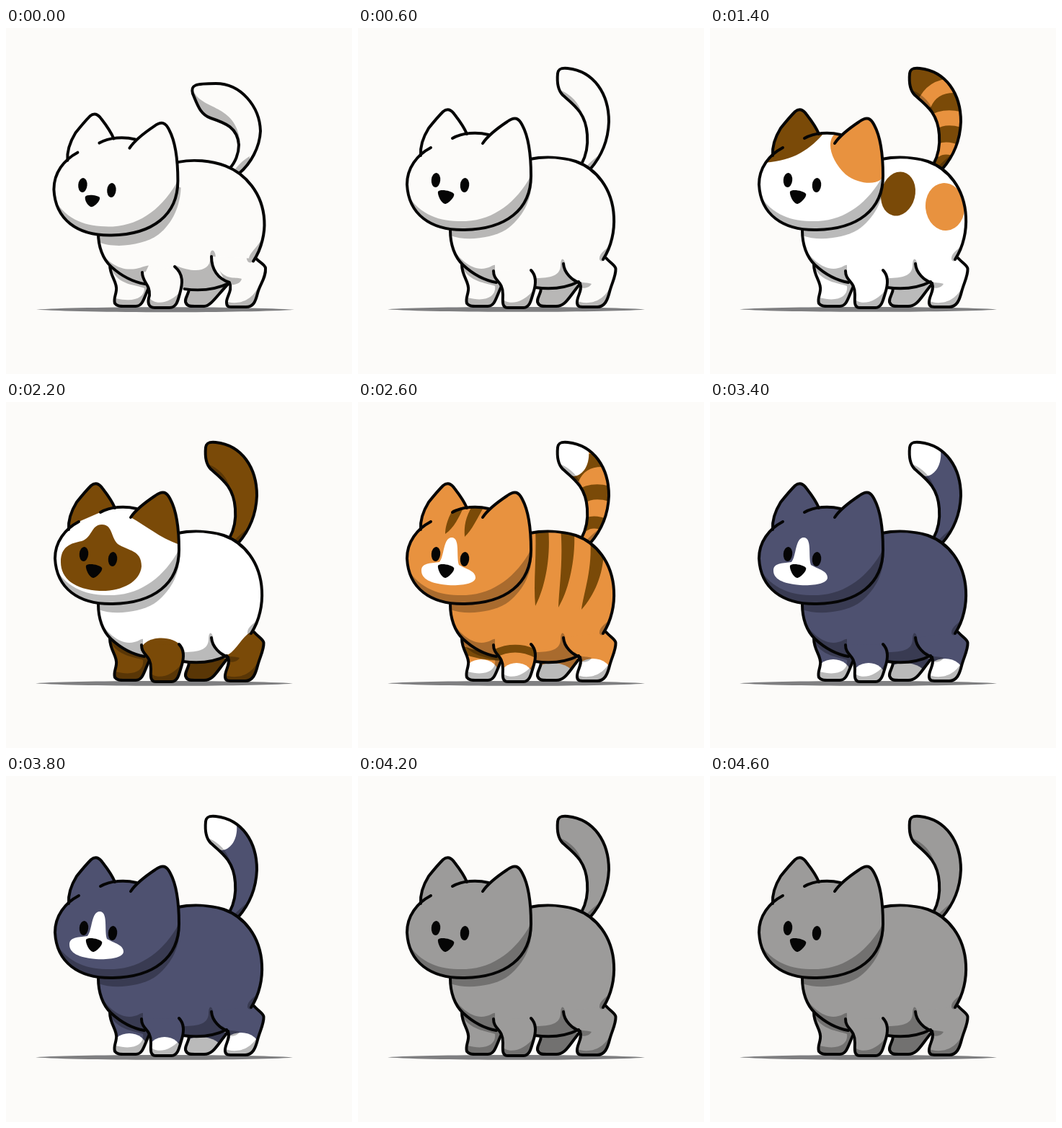
Recreate the animation shown at these times as an HTML page. Size 480 by 480 pixels, loop 4800 ms.

```html
<!DOCTYPE html>
<html lang="en">
<head>
<meta charset="utf-8">
<title>Walking coats</title>
<style>
html, body { margin: 0; width: 100%; height: 100%; overflow: hidden; background: #fcfbf9; }
svg { display: block; width: 100vw; height: 100vh; }
</style>
</head>
<body>
<svg id="stage" viewBox="0 0 480 480"></svg>
<script>
const STEP = 200;
const LIFTS = [0, 1, 1.13, 1];
const PAPER = '#fcfbf9', WHITE = '#fff', ORANGE = '#e8923f', BROWN = '#7a4a08', NAVY = '#4e5170', GREY = '#9c9b9a';

// Paths written "raised|lowered" are blended by the lift of the pose.
const extend = (path, end) => path.split('|').map(d => d + end).join('|');

const TAIL = 'M310 189C317 176 319 160 318 148C316 118 300 107 284 93C277 86 276 74 277 63C278 56 283 55 291 56C328 60 348 92 348 130C347 158 336 180 322 196'
  + '|M310 195C318 187 323 174 323 162C321 138 305 132 284 125C269 120 265 105 259 91C256 79 262 77 291 77C326 77 352 109 353 143C352 165 340 188 323 202';
const TAIL_SHADE = 'M277 85C295 91 308 104 312 124L285 110Z|M260 87C272 115 318 104 325 158L270 140Z';
const TAIL_ROOT = 'M313 198C319 188 325 184 332 178L332 202Z|M313 202C321 191 328 184 338 178L338 206Z';
const TAIL_TIP = 'M265 45L318 60C324 75 318 100 300 103L265 95Z|M240 60L298 70C304 90 298 112 280 120L245 115Z';
const BANDS = [
  ['M297 106Q308 80 338 80|M294 122Q296 98 316 84', 20],
  ['M308 132Q325 120 352 128|M308 146Q328 126 356 126', 21],
  ['M312 172Q326 162 346 172|M316 168Q334 160 356 174', 17]
];

const FAR_FRONT = 'M144 328C144 345 155 352 153 364C152 372 149 376 151 382C154 386 158 386 165 386L180 386C190 386 191 375 199 358';
const FAR_FRONT_SHADE = 'M143 326L146 335C158 354 182 354 190 358C192 372 178 381 152 374L148 392L202 392L202 326Z'
  + '|M143 326L146 334C156 358 182 356 192 361C192 374 178 381 152 375L148 392L202 392L202 326Z';
const FAR_HIND = 'M254 360C254 370 248 373 249 380C251 386 255 386 262 386L275 386C288 386 292 374 308 355'
  + '|M254 361C254 370 248 373 249 380C251 386 255 386 262 386L275 386C284 386 292 372 310 353';
const FRONT = 'M188 337C188 352 201 350 201 370C201 378 199 388 208 388L230 388C238 388 240 378 243 368C247 356 248 344 240 336'
  + '|M189 339C189 353 200 355 199 371C196 380 197 388 206 388L227 388C236 388 238 380 241 369C245 355 247 342 234 331';
const HIND = 'M285 327C286 340 297 350 308 354C312 365 303 372 304 382C305 387 308 387 314 387L332 387C342 387 346 378 349 366C352 354 358 344 357.5 334C357 329 350 326 344 319'
  + '|M285 317C285 335 294 348 310 353C315 364 305 374 306 381C306 387 309 387 315 387L333 387C343 387 346 380 349 368C352 356 361 346 360 333C359 328 353 326 347 320';
const HIND_SHADE = 'M300 346C308 356 318 352 324 355C320 362 312 361 305 360Z|M296 336C306 350 320 345 327 348C325 356 315 357 306 356Z';

const CHEST = 'M128 281C128 300 134 318 146 329C160 342 175 350 192 353';
const BELLY = 'M246 360C268 363 290 360 306 352';
const BACK = 'M238 182C258 178 282 179 302 185C330 195 353 222 355 262C356 280 352 303 340 321'
  + '|M238 182C258 178 282 180 302 187.5C329 198 353 226 355 264C356 280 352 303 340 321';
const BODY = extend(BACK, 'L306 352C290 360 268 363 246 360L192 353C175 350 160 342 146 329C134 318 128 300 128 281L180 200Z');
const RUMP_SHADE = 'M354 297C344 308 334 312 335 321C337 325 341 324 344 320L360 312Z|M358 275C350 302 332 308 334 321C336 327 341 327 345 321L362 310Z';
const BODY_SHADES = [
  'M128 288C150 296 185 292 205 280C228 264 240 240 241 215L200 200L128 270Z|M128 294C150 304 190 299 210 284C231 267 240 242 241 218L200 200L128 270Z',
  'M128 300C140 322 160 338 178 333C184 332 188 328 190 329L190 340L192 356L128 345Z|M128 303C140 322 156 334 176 332C186 331 192 327 197 327L191 340L192 356L128 345Z',
  'M244 347C262 347 280 346 281 330C281 320 284 317 287 325L292 340L308 352L306 366L244 366Z|M232 326C262 340 282 334 281 316C280 304 286 303 288 311L292 338L308 352L306 366L244 366Z',
  RUMP_SHADE
];

const FACE = 'M101 166C82 176 68 194 68 217C70 258 100 281 148 280C205 279 240 252 240 205C240 176 236 150 228 135C223 125 218 122 207 130C195 138 181 148 173 160';
const CROWN = 'M131 153C145 145 165 144 181 148';
const LEFT_EAR = 'M87 177C86 164 90 152 98 139C106 129 113 121 118 116C124 111 129 113 134 120C141 129 147 137 151 147';
const EAR_FILL = LEFT_EAR + 'L131 153L101 166Z';
const HEAD = FACE + 'L181 149C165 144 145 146 131 153Z' + EAR_FILL;
const CHIN = 'M68 230C88 263 118 269 150 268C190 266 222 240 242 201L250 290L60 290Z';
const NOSE = 'M111 227C114 223 130 226 133 230C135 234 125 244 121 244C116 244 110 232 111 227Z'
  + '|M111.5 227C114 223 129 225 131.5 228C133 232 125 241 120 241C116 241 110 232 111.5 227Z';
const BLAZE = 'M88 234C88 222 104 224 113 222C120 214 118 188 130 188C142 188 136 214 140 226C150 232 163 234 163 244C162 252 145 255 125 254C100 252 88 245 88 234Z';
const MASK = 'M76 222C76 200 90 196 105 193C120 188 118 170 133 170C148 170 145 187 155 197C170 207 188 205 188 228C186 250 160 263 130 262C95 260 76 245 76 222Z';

let lift = 1;

function blend(path) {
  const [high, low] = path.split('|');
  if (!low) return high;
  const lows = low.match(/-?[\d.]+/g).map(Number);
  let i = 0;
  return high.replace(/-?[\d.]+/g, n => {
    const from = lows[i++];
    return (from + (n - from) * lift).toFixed(2);
  });
}

const fill = (d, color) => `<path d="${blend(d)}" fill="${color}"/>`;
const shade = d => fill(d, 'rgba(0,0,0,.27)');
const line = (d, width = 4, color = '#050505', cap = 'round') =>
  `<path d="${blend(d)}" fill="none" stroke="${color}" stroke-width="${width}" stroke-linecap="${cap}" stroke-linejoin="round"/>`;
const oval = (x, y, rx, ry, color, turn = 0) =>
  `<ellipse cx="${x}" cy="${y}" rx="${rx}" ry="${ry}" fill="${color}" transform="rotate(${turn} ${x} ${y})"/>`;
const bands = color => BANDS.map(([d, width]) => line(d, width, color, 'butt')).join('');
const group = (matrix, content) => `<g transform="matrix(${matrix})">${content}</g>`;

function part(id, shape, color, marks, shades) {
  return `<clipPath id="${id}"><path d="${blend(shape)}"/></clipPath>` + fill(shape, color)
    + `<g clip-path="url(#${id})">${marks || ''}${shades.map(shade).join('')}</g>`;
}

const socks = () => ({
  front: oval(220, 382, 23, 20, WHITE),
  farFront: oval(171, 377, 24, 20, WHITE),
  hind: oval(326, 377, 26, 21, WHITE),
  farHind: oval(270, 381, 30, 19, WHITE),
  head: fill(BLAZE, WHITE),
  tail: fill(TAIL_TIP, WHITE)
});

const COATS = [
  () => ({ base: PAPER }),
  () => ({
    base: WHITE,
    tailBase: BROWN,
    tail: bands(ORANGE),
    body: oval(261, 230, 23.5, 31, BROWN, 14) + oval(326, 248, 27, 33, ORANGE, -6),
    head: fill('M70 187C110 186 135 172 156 148L150 100L70 100Z', BROWN)
      + fill('M174 146C160 158 168 184 188 203C206 217 228 217 236 211L250 195L235 110L210 110Z', ORANGE)
  }),
  () => ({
    base: WHITE,
    tailBase: BROWN,
    legBase: BROWN,
    hindBase: WHITE,
    body: fill('M187 345C190 323 232 323 242 338L242 345Z', BROWN),
    hind: fill('M300 352L309 350C322 342 328 322 346 316L370 330L350 400L295 400Z', BROWN),
    head: fill(EAR_FILL, BROWN) + fill(MASK, BROWN)
      + fill('M173 160C195 172 215 190 244 199L245 110L200 110L181 148Z', BROWN)
  }),
  () => {
    const coat = socks();
    return {
      ...coat,
      base: ORANGE,
      tail: bands(BROWN) + coat.tail,
      body: fill('M246 176C248 215 243 250 246 283C258 260 268 220 264 174Z', BROWN)
        + fill('M281 174C285 220 279 255 278 285C292 262 302 220 300 180Z', BROWN)
        + fill('M322 188C326 230 313 265 310 288C328 268 340 240 341 208Z', BROWN),
      front: line('M188 350Q218 334 248 350', 11, BROWN) + coat.front,
      farFront: line('M146 344Q168 353 200 354', 10, BROWN) + coat.farFront,
      head: fill('M131 150C123 165 121 175 121 183C133 175 140 160 147 145Z', BROWN)
        + fill('M159 143C149 160 147 172 148 187C158 178 165 162 176 143Z', BROWN) + coat.head
    };
  },
  () => ({ ...socks(), base: NAVY }),
  () => ({ base: GREY })
];

function cat(coat) {
  const drop = 1 - lift;
  const leg = coat.legBase || coat.base;
  const bodyMatrix = [1 + .015 * drop, 0, 0, 1 - .01 * drop, -2 * drop, 5.7 * drop];
  const headMatrix = [1, 0, 0, 1 + .007 * drop, -1.6 * drop, 5.5 * drop];

  return fill('M41 390.3C100 386 340 386 398 390.5C340 395 100 395 41 390.3Z|M42 390.6C100 386 340 386 400 390.8C340 395.5 100 395.5 42 390.6Z', '#7f7f81')
    + part('tail', TAIL, coat.tailBase || coat.base, coat.tail, [TAIL_SHADE, TAIL_ROOT]) + line(TAIL)
    + part('farFront', FAR_FRONT + 'L190 335Z', leg, coat.farFront, [FAR_FRONT_SHADE]) + line(FAR_FRONT)
    + part('farHind', FAR_HIND, leg, coat.farHind, ['M240 340H320V395H240Z']) + line(FAR_HIND)
    + group(bodyMatrix, part('body', BODY, coat.base, coat.body, BODY_SHADES))
    + part('front', FRONT, leg, coat.front, ['M198 373C206 386 230 384 248 358L250 395L195 395Z']) + line(FRONT)
    + part('hind', HIND, coat.hindBase || leg, coat.hind,
      [HIND_SHADE, RUMP_SHADE, 'M302 378C315 384 340 384 352 355L360 395L300 395Z']) + line(HIND)
    + group(bodyMatrix, [CHEST, BELLY, BACK].map(d => line(d)).join(''))
    + group(headMatrix, part('head', HEAD, coat.base, coat.head, [CHIN])
      + [FACE, CROWN, LEFT_EAR].map(d => line(d)).join('')
      + oval(108, 211, 6.2, 10, '#050505', 5) + oval(148, 218, 6.2, 10, '#050505', 5)
      + fill(NOSE, '#050505'));
}

const stage = document.getElementById('stage');
let shown = -1;

function render(time) {
  const step = Math.floor(time / STEP) % (LIFTS.length * COATS.length);
  if (step !== shown) {
    shown = step;
    lift = LIFTS[step % LIFTS.length];
    stage.innerHTML = cat(COATS[Math.floor(step / LIFTS.length)]());
  }
}

function tick() {
  render(performance.now());
  requestAnimationFrame(tick);
}
tick();
</script>
</body>
</html>
```
